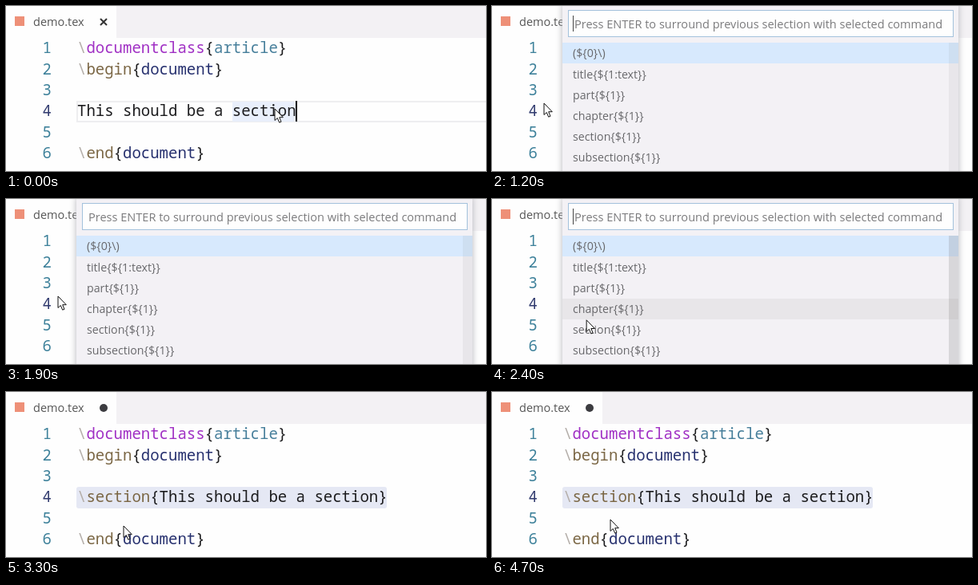
Write an HTML page with a canvas that moves like this. It is 600x207 px and loops after 4800 ms.

```html
<!DOCTYPE html>
<html lang="en">
<head>
<meta charset="utf-8">
<style>
html, body { margin: 0; width: 100%; height: 100%; overflow: hidden; }
canvas { display: block; }
</style>
</head>
<body>
<canvas id="stage" width="600" height="207"></canvas>
<script>
const ctx = document.getElementById('stage').getContext('2d');
const LOOP = 4800, STEP = 100;
const LEFT = 89, CHAR = 11.4, ROW = 26.35;
const OPEN = 1100, CLOSE = 3300;
const MONO = '19px "Noto Sans Mono", monospace';
const ui = size => `${size}px "Open Sans", sans-serif`;

const SLASH = '#b4aea9', BLACK = '#1c1c1e', BROWN = '#7b6745', NAVY = '#27316f';
const code = {
  1: [['\\', SLASH], ['documentclass', '#a030c4'], ['{', BLACK], ['article', '#477f9b'], ['}', BLACK]],
  2: [['\\', SLASH], ['begin', BROWN], ['{', BLACK], ['document', NAVY], ['}', BLACK]],
  6: [['\\', SLASH], ['end', BROWN], ['{', BLACK], ['document', NAVY], ['}', BLACK]]
};
const sentence = ['This should be a section', BLACK];
const plainLine = [sentence];
const sectionLine = [['\\', SLASH], ['section', BROWN], ['{', BLACK], sentence, ['}', BLACK]];
const commands = ['(${0}\\)', 'title{${1:text}}', 'part{${1}}', 'chapter{${1}}', 'section{${1}}', 'subsection{${1}}'];

const clamp = v => Math.min(1, Math.max(0, v));
const ease = (t, from, to) => {
  const p = clamp((t - from) / (to - from));
  return p * p * (3 - 2 * p);
};

function rect(x, y, w, h, color) {
  ctx.fillStyle = color;
  ctx.fillRect(x, y, w, h);
}

function text(str, x, y, font, color, align = 'left') {
  ctx.font = font;
  ctx.fillStyle = color;
  ctx.textAlign = align;
  ctx.fillText(str, x, y);
}

function pointerAt(t) {
  const drag = ease(t, 0, 450), hover = ease(t, 1980, 2680), rest = ease(t, 4100, 4500);
  return {
    x: 336 - 271 * drag + 82 * hover + rest,
    y: 129 - 7 * drag + 46 * hover - 8 * rest
  };
}

function drawTab(dirty) {
  rect(0, 0, 600, 207, '#fefefe');
  rect(138, 0, 462, 40, '#f3f1f4');
  rect(11, 13, 12, 12, '#ee9078');
  text('demo.tex', 34, 25, ui(14.5), '#555');
  if (dirty) {
    ctx.fillStyle = '#3c3c40';
    ctx.beginPath();
    ctx.arc(122, 20, 5, 0, 7);
    ctx.fill();
  } else {
    ctx.strokeStyle = '#333';
    ctx.lineWidth = 2;
    ctx.stroke(new Path2D('M118 16l8 8m0-8l-8 8'));
  }
}

function drawEditor(t, inserted) {
  drawTab(inserted);
  const pointer = pointerAt(t - STEP);
  const column = t < STEP ? 24 : Math.max(0, Math.round((pointer.x - LEFT) / CHAR));
  const caret = LEFT + column * CHAR;

  if (inserted) {
    ctx.fillStyle = '#e5e8f4';
    ctx.beginPath();
    ctx.roundRect(88, 119, 388, 27, 3);
    ctx.fill();
  } else if (column === 24) {
    ctx.strokeStyle = '#eeeef0';
    ctx.lineWidth = 2;
    ctx.strokeRect(89, 120, 520, 25);
    rect(283, 120, 79, 25, '#e9effb');
  } else {
    rect(caret, 119, 362 - caret, 27, '#b1d5fd');
  }

  for (let n = 1; n <= 6; n++) {
    const y = 59.3 + (n - 1) * ROW;
    text(n, 57, y, MONO, n === 4 ? '#333d70' : '#3f829b', 'right');
    let x = LEFT;
    const line = n === 4 ? (inserted ? sectionLine : plainLine) : code[n] || [];
    for (const [part, color] of line) {
      text(part, x, y, MONO, color);
      x += part.length * CHAR;
    }
  }
  if (t < 750) rect(Math.round(caret) - 1, 119, 2, 26, '#000');
}

function drawPalette(t) {
  ctx.save();
  ctx.shadowColor = '#b4b4ba';
  ctx.shadowBlur = 8;
  ctx.shadowOffsetY = 3;
  rect(88, -5, 495, 230, '#f3f1f5');
  ctx.restore();

  rect(95, 5, 482, 34, '#fefefe');
  ctx.strokeStyle = '#a3c1dc';
  ctx.lineWidth = 1;
  ctx.strokeRect(95.5, 5.5, 481, 33);
  text('Press ENTER to surround previous selection with selected command', 103, 28, ui(14.55), '#7b7b7d');
  if ((t - OPEN) % 1000 < 500) rect(101, 12, 1, 20, '#444');

  const pointer = pointerAt(t - STEP);
  const hovered = pointer.x > 88 ? Math.floor((pointer.y - 46) / 26.2) : 0;
  commands.forEach((command, i) => {
    const y = 46 + i * 26.2;
    if (i === 0) rect(88, 46, 495, 26, '#d7e9fd');
    else if (i === hovered) rect(88, Math.round(y), 495, 26, '#e8e6e9');
    text(command, 101, y + 18.3, ui(14.2), '#68686b');
  });
  // The scrollbar fades in once the pointer is over the list.
  ctx.globalAlpha = 0.08 + 0.32 * clamp((t - 2300) / 300);
  rect(571, 46, 12, 161, '#646466');
  ctx.globalAlpha = 1;
}

function drawPointer({ x, y }) {
  const arrow = new Path2D('M0 0V14.5L3.3 11.5 5.7 17.2 8 16.2 5.7 10.7H10.3Z');
  ctx.save();
  ctx.translate(x, y);
  ctx.fillStyle = '#fff';
  ctx.strokeStyle = '#111';
  ctx.lineWidth = 1;
  ctx.fill(arrow);
  ctx.stroke(arrow);
  ctx.restore();
}

function frame() {
  const t = Math.floor(performance.now() % LOOP / STEP) * STEP;
  drawEditor(t, t >= CLOSE);
  if (t >= OPEN && t < CLOSE) drawPalette(t);
  drawPointer(pointerAt(t));
  requestAnimationFrame(frame);
}
frame();
</script>
</body>
</html>
```
